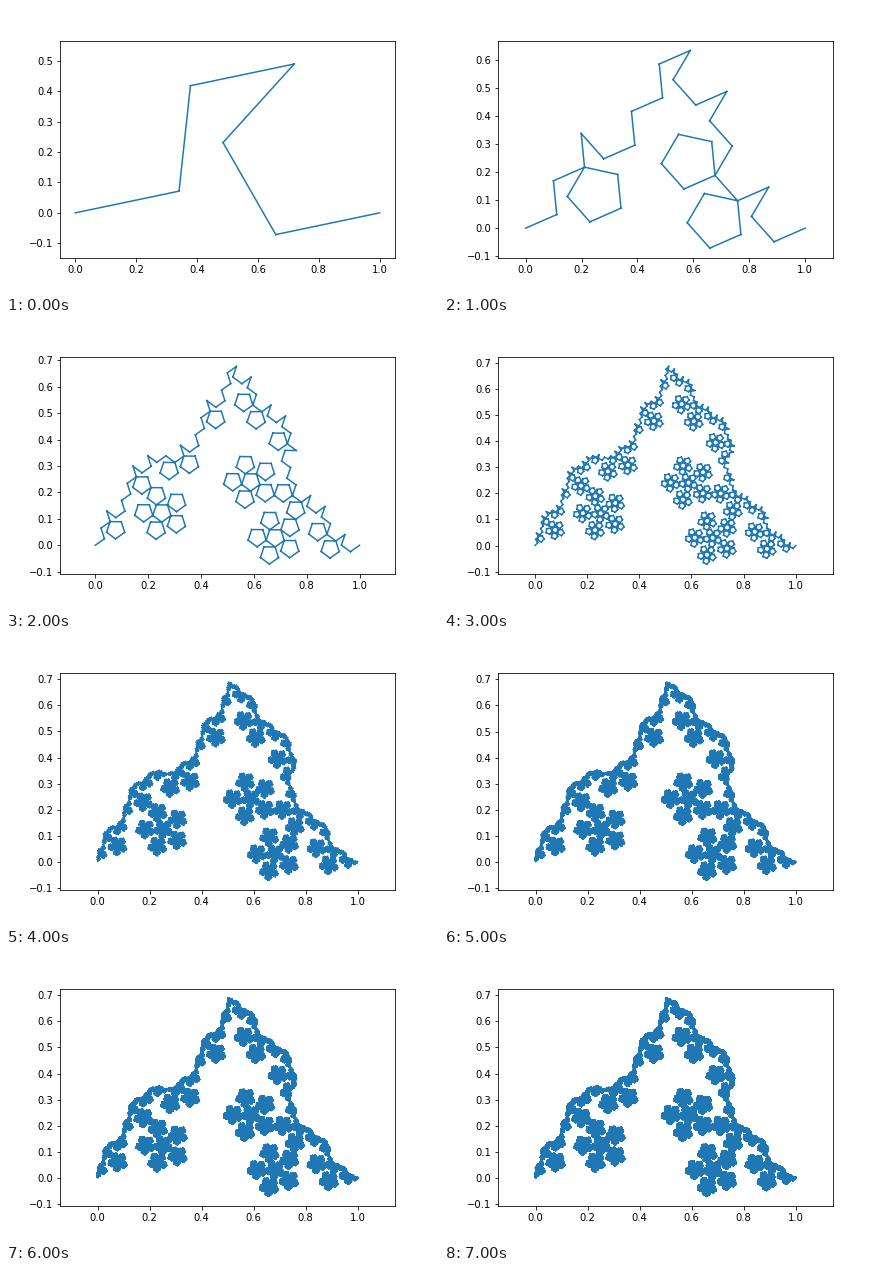
Recreate the animation shown at these times as a matplotlib script. Size 432x288 px, loop 8 s.

```python
import numpy as np
import matplotlib.pyplot as plt
from matplotlib.animation import FuncAnimation

LEVELS = 8
# Headings of the pentadendrite generator, in steps of 72 degrees
TURNS = np.exp(1j * np.radians(72) * np.array([0, 1, 0, -2, -1, 0]))
STEPS = TURNS / TURNS.sum()


def curve(depth):
    """Vertices of the curve from 0 to 1 after `depth` substitutions."""
    steps = np.ones(1, complex)
    for _ in range(depth):
        steps = np.outer(steps, STEPS).ravel()
    return np.concatenate([[0], np.cumsum(steps)])


def strokes(pts):
    """Flat coordinates of separate segments, with gaps between them."""
    gap = np.full(len(pts) - 1, np.nan)
    x, y = (np.column_stack([v[:-1], v[1:], gap]).ravel()
            for v in (pts.real, pts.imag))
    return x, y


plt.rcParams["agg.path.chunksize"] = 30000
fig, ax = plt.subplots(figsize=(6, 4), dpi=72)
fig.subplots_adjust(bottom=0.125)


def draw(frame):
    ax.clear()
    ax.plot(*strokes(curve(frame + 1)))
    ax.axis("equal")


anim = FuncAnimation(fig, draw, frames=LEVELS, interval=1000,
                     init_func=lambda: None, repeat=True, repeat_delay=0)
plt.show()
```
